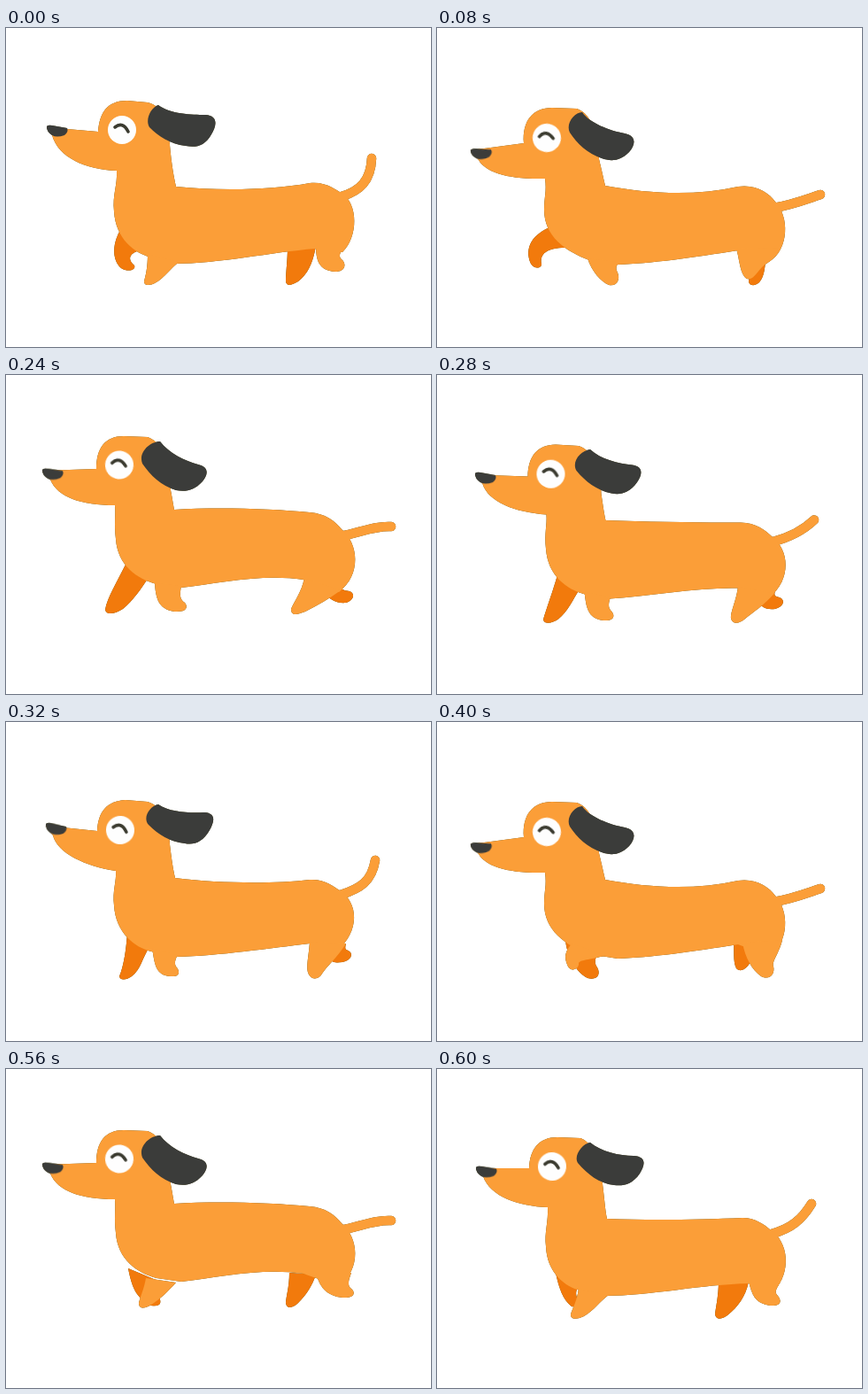
An HTML page without scripts for the animation above (640 ms loop, 480 px wide and 360 px high).

```html
<!DOCTYPE html>
<html lang="en">
<head>
<meta charset="utf-8">
<title>Trotting dachshund</title>
<style>
html, body { margin: 0; width: 100%; height: 100%; overflow: hidden; background: #fff; }
svg { display: block; width: 480px; height: 360px; }
.dog { fill: #fb9e38; filter: drop-shadow(0 0 .5px #55501c); }
.far { fill: #f27a0c; }
.dark { fill: #3b3c3a; }
.line { fill: none; stroke-linecap: round; stroke-linejoin: round; }
#tail { stroke: #fb9e38; stroke-width: 10.5; }
#brow { stroke: #3b3b30; stroke-width: 3.6; }

/* Poses every 80 ms, advanced on 40 ms ticks */
.dog [id] { animation: .64s steps(2) infinite; }
#body { animation-name: body; }
#tail { animation-name: tail; }
#ear { animation-name: ear; }
#nose { animation-name: nose; }
#eye { animation-name: eye; }
#front { animation-name: front; }
#front-far { animation-name: front-far; }
#hind { animation-name: hind; }
#hind-far { animation-name: hind-far; }
.dog #brow { animation: none; }

@keyframes body {
  87.5%, 93.75% { animation-timing-function: steps(1); }
  0%, 100% { d: path("M46 112L104 117C106 95 114 82 137 82L160 84C178 88 185 110 185 132C187 155 190 170 192 179C240 184 300 183 343 175C362 173 372 183 379 186C398 198 398 236 380 253L349 249C300 253 240 266 190 266L164 259C145 254 124 238 122 207C120 188 126 178 125 161C90 160 59 146 52 121Z"); }
  12.5%, 62.5% { d: path("M38 138L98 130C96 105 108 90 130 90L158 91C176 97 183 125 183 148C186 160 188 170 190 178C240 187 290 190 340 179C360 176 375 186 382 196C398 212 398 250 375 264L340 251C290 259 240 266 204 267L172 262C145 252 121 235 121 205C121 190 124 185 122 170C80 171 55 163 47 149Z"); }
  25% { d: path("M35 134L94 115C92 88 104 70 130 70L153 69C172 78 182 115 184 137C186 145 188 150 190 154C240 153 300 152 343 156C365 158 376 172 384 181C398 192 398 225 378 244L334 231C290 226 240 236 198 240L170 238C150 232 128 215 124 185C122 170 122 160 121 151C85 160 55 157 46 143Z"); }
  37.5%, 87.5% { d: path("M41 108L102 106C102 82 112 69 133 69L160 70C178 76 186 105 186 130C188 140 189 147 190 152C240 149 300 151 343 155C360 156 372 165 379 174C398 190 402 225 376 245L336 231C290 224 240 235 198 240L170 236C148 230 126 215 124 185C122 168 124 158 123 147C85 147 58 138 50 118Z"); }
  50% { d: path("M45 117L103 123C104 101 114 89 135 88L160 90C178 95 185 118 185 138C187 155 189 168 191 176C240 182 300 183 343 178C360 177 370 186 377 190C398 204 400 236 374 258L343 250C300 255 240 264 192 265L164 259C145 254 124 238 122 207C120 190 125 180 124 168C90 163 58 148 53 128Z"); }
  75% { d: path("M37 139L95 117C93 90 104 70 130 70L155 70C174 79 183 116 184 137C186 145 188 150 190 154C240 152 300 151 343 156C362 158 372 168 383 180C396 192 395 225 388 243L352 232C290 226 240 238 188 241L165 238C150 232 128 215 124 185C122 170 122 160 121 151C85 161 58 161 48 148Z"); }
  93.75% { d: path("M44 112L104 112C105 90 115 77 136 77L162 78C178 84 186 108 187 130C189 145 190 160 192 169C240 171 300 170 345 168C360 168 370 176 376 181C398 195 400 230 381 250L352 242C300 243 240 256 190 256L162 250C145 246 124 230 123 200C121 185 126 172 125 156C92 155 60 144 52 121Z"); }
}
@keyframes tail {
  87.5%, 93.75% { animation-timing-function: steps(1); }
  0%, 100% { d: path("M379 190C400 184 412 172 413 147"); }
  12.5%, 62.5% { d: path("M380 203C400 200 415 194 433 188"); }
  25% { d: path("M380 188C410 186 428 186 432 208"); }
  37.5%, 87.5% { d: path("M378 182C400 178 415 170 435 171"); }
  50% { d: path("M378 195C400 188 413 180 417 156"); }
  75% { d: path("M380 185C410 184 430 182 435 195"); }
  93.75% { d: path("M378 186C400 180 412 170 423 152"); }
}
@keyframes ear {
  87.5%, 93.75% { animation-timing-function: steps(1); }
  0%, 100% { d: path("M172 87C185 97 210 98 225 98C240 99 238 110 232 120C224 134 214 135 203 133C185 131 172 122 162 112C157 104 163 90 172 87Z"); }
  12.5%, 62.5% { d: path("M164 95C172 107 195 116 212 119C226 122 224 132 217 140C207 150 197 151 186 147C170 142 158 130 150 118C145 108 155 95 164 95Z"); }
  25% { d: path("M160 75C164 90 180 102 198 110C212 116 208 124 202 128C192 136 183 138 175 136C162 130 148 115 140 97C136 85 150 74 160 75Z"); }
  37.5%, 87.5% { d: path("M174 75C184 88 202 97 217 101C230 104 228 113 222 120C212 131 202 132 192 130C175 125 163 113 154 100C149 87 163 75 174 75Z"); }
  50% { d: path("M172 93C185 102 208 103 224 102C238 103 235 113 230 122C222 136 212 139 202 137C185 135 172 127 161 116C154 108 162 95 172 93Z"); }
  75% { d: path("M162 76C166 91 181 103 199 111C213 117 209 125 203 129C193 137 184 139 176 137C163 131 149 116 142 98C137 86 152 75 162 76Z"); }
  93.75% { d: path("M173 83C185 93 206 98 222 98C237 99 235 108 229 118C220 131 210 132 200 131C183 129 170 119 159 106C154 98 164 84 173 83Z"); }
}
@keyframes nose {
  87.5%, 93.75% { animation-timing-function: steps(1); }
  0%, 100% { transform: translate(46px, 112px) rotate(0deg); }
  12.5%, 62.5% { transform: translate(38px, 139px) rotate(-7deg); }
  25% { transform: translate(35px, 135px) rotate(-18deg); }
  37.5%, 87.5% { transform: translate(41px, 108px) rotate(-2deg); }
  50% { transform: translate(45px, 116px) rotate(3deg); }
  75% { transform: translate(37px, 140px) rotate(-21deg); }
  93.75% { transform: translate(44px, 112px) rotate(-1deg); }
}
@keyframes eye {
  87.5%, 93.75% { animation-timing-function: steps(1); }
  0%, 100% { transform: translate(131px, 115px) rotate(0deg); }
  12.5%, 62.5% { transform: translate(124px, 124px) rotate(-11deg); }
  25% { transform: translate(119px, 105px) rotate(-20deg); }
  37.5%, 87.5% { transform: translate(128px, 101.5px) rotate(-6deg); }
  50% { transform: translate(129px, 122px) rotate(2deg); }
  75% { transform: translate(120px, 104.5px) rotate(-22deg); }
  93.75% { transform: translate(130px, 110px) rotate(-3deg); }
}
@keyframes front {
  87.5%, 93.75% { animation-timing-function: steps(1); }
  0%, 100% { d: path("M160 255C160 270 158 278 156 286C156 292 164 290 168 288C180 282 186 270 196 264Z"); }
  12.5% { d: path("M170 260C175 275 185 286 194 290C204 292 207 283 204 276C201 270 203 268 206 264Z"); }
  25% { d: path("M168 234C173 255 178 268 196 268C208 267 207 260 202 254C197 250 198 245 200 239Z"); }
  37.5% { d: path("M168 234C169 252 172 264 190 267C204 268 206 262 202 257C196 253 196 248 198 238Z"); }
  50% { d: path("M165 255C168 272 168 286 186 287C198 288 196 280 192 276C190 272 191 268 194 263Z"); }
  62.5% { d: path("M152 250C146 258 142 264 148 276C152 283 161 278 160 272C162 268 176 268 192 263Z"); }
  75% { d: path("M152 232C148 243 142 248 140 257C141 264 152 262 158 261C172 257 182 248 190 240Z"); }
  87.5% { d: path("M158 236C156 248 152 256 150 264C150 272 158 270 164 266C174 260 184 250 192 241Z"); }
  93.75% { d: path("M160 248C158 262 153 270 151 277C151 284 160 282 166 279C178 272 184 262 194 255Z"); }
}
@keyframes front-far {
  87.5%, 93.75% { animation-timing-function: steps(1); }
  0%, 100% { d: path("M128 230C120 245 120 262 130 271C138 276 147 273 145 268C138 262 138 256 148 252Z"); }
  12.5% { d: path("M130 224C108 232 98 248 106 266C110 273 119 271 118 266C116 255 124 248 145 248Z"); }
  25% { d: path("M134 208C118 226 106 240 103 253C105 261 114 256 120 254C134 248 146 238 155 230Z"); }
  37.5% { d: path("M136 212C126 232 114 252 112 265C114 272 124 269 132 264C144 254 152 242 160 230Z"); }
  50% { d: path("M137 236C136 256 133 275 128 287C129 293 138 290 142 287C152 280 154 266 162 254Z"); }
  62.5% { d: path("M145 245C146 262 156 282 170 289C182 292 185 284 181 277C176 270 180 264 184 258Z"); }
  75% { d: path("M141 222C148 240 152 258 172 266C186 270 190 264 187 261C180 256 180 248 186 240Z"); }
  87.5% { d: path("M138 225C142 245 146 258 164 267C176 269 176 262 172 256C168 250 170 246 174 240Z"); }
  93.75% { d: path("M134 230C138 248 142 260 152 268C158 270 158 262 158 258C156 252 158 248 160 246Z"); }
}
@keyframes hind {
  87.5%, 93.75% { animation-timing-function: steps(1); }
  0%, 100% { d: path("M350 245C350 262 353 274 372 275C384 275 384 266 380 262C375 258 376 254 384 245Z"); }
  12.5% { d: path("M338 249C342 262 342 278 350 283C358 286 364 270 372 266C378 262 384 256 388 248Z"); }
  25% { d: path("M334 230C333 245 326 258 324 264C324 272 332 270 340 267C352 260 366 254 380 242Z"); }
  37.5% { d: path("M337 229C334 245 324 258 322 264C322 273 330 270 338 267C352 260 366 252 378 243Z"); }
  50% { d: path("M343 248C342 265 338 278 342 285C346 292 354 290 357 284C362 276 374 266 384 250Z"); }
  62.5% { d: path("M345 249C348 266 356 280 366 287C376 292 382 284 380 276C378 270 386 262 390 246Z"); }
  75% { d: path("M352 231C358 244 366 254 384 258C396 260 398 254 394 249C388 244 390 238 390 230Z"); }
  87.5% { d: path("M350 230C354 246 362 256 380 258C394 259 395 252 390 248C385 244 387 238 390 230Z"); }
  93.75% { d: path("M352 240C356 254 358 264 376 267C390 268 389 261 385 256C381 252 382 250 388 240Z"); }
}
@keyframes hind-far {
  87.5%, 93.75% { animation-timing-function: steps(1); }
  0%, 100% { d: path("M318 248C318 262 316 276 316 286C317 293 325 289 330 286C340 278 346 268 350 246Z"); }
  12.5% { d: path("M352 260C356 272 354 280 352 285C352 292 360 291 364 287C370 280 370 270 372 258Z"); }
  25% { d: path("M358 246C364 254 372 258 378 261C386 263 390 256 386 250C380 246 378 243 380 238Z"); }
  37.5% { d: path("M360 246C366 254 374 258 384 257C394 254 394 246 388 244C380 243 378 242 380 236Z"); }
  50% { d: path("M362 262C368 272 370 272 380 271C390 269 392 262 388 259C384 256 382 258 384 250Z"); }
  62.5% { d: path("M335 246C336 258 334 270 338 278C344 284 352 276 354 270C358 264 366 258 368 246Z"); }
  75% { d: path("M320 228C321 245 318 256 319 262C321 268 329 266 333 261C340 252 346 244 350 230Z"); }
  87.5% { d: path("M320 230C320 246 316 258 316 264C317 272 325 269 330 264C340 254 346 244 350 232Z"); }
  93.75% { d: path("M318 240C318 256 315 268 314 277C316 285 324 281 328 278C340 268 348 258 352 240Z"); }
}
</style>
</head>
<body>
<svg viewBox="0 0 480 360">
  <g class="dog">
    <path id="front-far" class="far"/>
    <path id="hind-far" class="far"/>
    <path id="tail" class="line"/>
    <path id="body"/>
    <path id="front"/>
    <path id="hind"/>
    <path id="nose" class="dark" d="M0 0Q0-3 6-2L23 1Q25 5 20 9Q11 12 6 9Q0 5 0 0Z"/>
    <g id="eye">
      <circle r="16" fill="#fefefe"/>
      <path id="brow" class="line" d="M-8-3Q1-10 7 2"/>
    </g>
    <path id="ear" class="dark"/>
  </g>
</svg>
</body>
</html>
```
